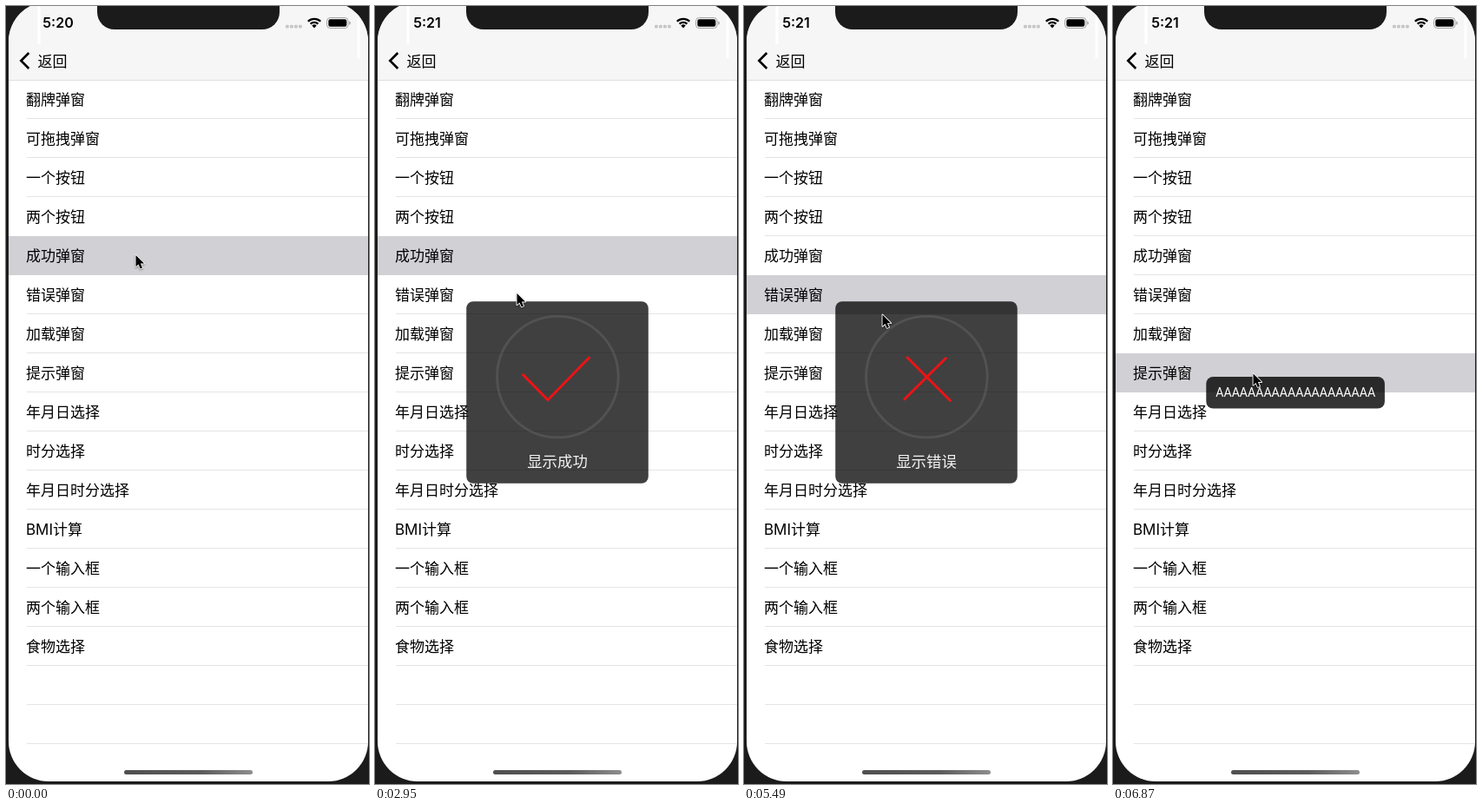
An HTML page with a canvas for the animation above (8 s loop, 418 px wide and 896 px high).

```html
<!DOCTYPE html>
<html lang="zh-CN">
<head>
<meta charset="utf-8">
<title>弹窗</title>
<style>
html, body { margin: 0; width: 100%; height: 100%; overflow: hidden; background: #1b1b1b; }
canvas { display: block; width: 418px; height: 896px; }
</style>
</head>
<body>
<canvas id="stage" width="418" height="896"></canvas>
<script>
const ctx = document.getElementById('stage').getContext('2d');
const LOOP = 8000;
const BEZEL = '#1b1b1b';
const RED = '#fb0f12';
const SANS = 'Inter, "Noto Sans CJK SC", "Noto Sans CJK", sans-serif';
const LABELS = ['翻牌弹窗', '可拖拽弹窗', '一个按钮', '两个按钮', '成功弹窗', '错误弹窗', '加载弹窗', '提示弹窗',
  '年月日选择', '时分选择', '年月日时分选择', 'BMI计算', '一个输入框', '两个输入框', '食物选择'];
const RING = { x: 210.4, y: 426.5, r: 72.2 };
const CURSOR = [[0, 149.5, 287], [2200, 149.5, 287], [2540, 163.5, 331], [5040, 163.5, 331],
  [5490, 159.5, 355.5], [5890, 155, 366], [6170, 161.5, 423.5], [LOOP, 161.5, 423.5]];

const clamp = v => Math.max(0, Math.min(1, v));
const progress = (t, from, length) => clamp((t - from) / length);
const easeInOut = p => p < 0.5 ? 2 * p * p : 1 - 2 * (1 - p) * (1 - p);

function fillRect(x, y, w, h, color) {
  ctx.fillStyle = color;
  ctx.fillRect(x, y, w, h);
}

function roundRect(x, y, w, h, r, color) {
  ctx.beginPath();
  ctx.roundRect(x, y, w, h, r);
  ctx.fillStyle = color;
  ctx.fill();
}

function polyline(points) {
  ctx.beginPath();
  points.forEach(p => ctx.lineTo(...p));
}

function stroke(color, width) {
  ctx.strokeStyle = color;
  ctx.lineWidth = width;
  ctx.stroke();
}

function text(str, x, y, font, color = '#000', align = 'left') {
  ctx.font = font;
  ctx.fillStyle = color;
  ctx.textAlign = align;
  ctx.fillText(str, x, y);
}

function drawStatusBar(clock) {
  text(clock, 60, 25.3, '600 16px ' + SANS, '#000', 'center');
  for (let i = 0; i < 4; i++) roundRect(322 + i * 5, 21.7, 3.8, 3.8, 1.2, '#c6c6c8');

  // Wi-Fi: two bands and a wedge around one centre
  const a = Math.PI * 0.25;
  for (const r of [10.2, 6.2]) {
    ctx.beginPath();
    ctx.arc(355, 25, r, -Math.PI + a, -a);
    stroke('#000', 2.3);
  }
  ctx.beginPath();
  ctx.moveTo(355, 25.6);
  ctx.arc(355, 25.2, 3.8, -Math.PI + a, -a);
  ctx.fillStyle = '#000';
  ctx.fill();

  ctx.beginPath();
  ctx.roundRect(369.5, 13.5, 24.5, 12, 3.8);
  stroke('#a3a3a5', 1);
  roundRect(371.3, 15.3, 21, 8.4, 2.2, '#000');
  roundRect(395.2, 17.5, 1.6, 4, [0, 1.6, 1.6, 0], '#a3a3a5');
}

function drawScreen(selected, clock) {
  fillRect(0, 0, 418, 896, BEZEL);
  ctx.save();
  ctx.beginPath();
  ctx.roundRect(3, -5, 414, 898, 46);
  ctx.clip();
  fillRect(0, 0, 418, 896, '#fff');
  fillRect(0, 0, 418, 85, '#f6f6f6');
  fillRect(36.5, 0, 3, 44, '#fff');
  fillRect(404.5, 0, 3, 60, '#fff');
  fillRect(0, 85, 418, 1, '#dfdfdf');

  for (let i = 0; i < 17; i++) {
    if (i !== selected && i !== selected - 1) fillRect(24, 129 + i * 45, 394, 1, '#e4e4e5');
  }
  fillRect(0, 265 + (selected - 4) * 45, 418, 45, '#d1d0d5');
  LABELS.forEach((label, i) => text(label, 23, 114 + i * 45, '17px ' + SANS));

  polyline([[26.3, 54], [17.3, 63], [26.3, 72]]);
  stroke('#000', 2.6);
  text('返回', 36.5, 69.5, '17px ' + SANS);
  drawStatusBar(clock);

  const bar = ctx.createLinearGradient(136, 0, 284, 0);
  bar.addColorStop(0, '#505050');
  bar.addColorStop(0.6, '#5c5c5c');
  bar.addColorStop(1, '#8e8e8e');
  roundRect(136, 880, 148, 5, 2.5, bar);
  ctx.restore();

  roundRect(105, -20, 210, 47, 20, BEZEL);
}

// Runs along an arc of the ring from angle 0, then along the given points;
// only the part from `rest` to the end stays visible.
function drawTrail(p, sweep, points, rest) {
  const end = sweep * Math.PI / 180;
  const corner = [RING.x + RING.r * Math.cos(end), RING.y + RING.r * Math.sin(end)];
  const arc = Math.abs(end) * RING.r;
  let total = arc, last = corner;
  for (const q of points) {
    total += Math.hypot(q[0] - last[0], q[1] - last[1]);
    last = q;
  }
  const tail = arc + Math.hypot(rest[0] - corner[0], rest[1] - corner[1]);
  const from = tail * progress(p, 0.3, 0.7);
  const to = total * p;
  if (to <= from) return;
  ctx.beginPath();
  ctx.arc(RING.x, RING.y, RING.r, 0, end, sweep < 0);
  points.forEach(q => ctx.lineTo(...q));
  ctx.setLineDash([to - from, total * 2]);
  ctx.lineDashOffset = -from;
  stroke(RED, 3);
  ctx.setLineDash([]);
}

function drawCheck(p) {
  drawTrail(p, -157, [[198.6, 454], [248.6, 402.8]], [167.6, 423.5]);
}

function drawCross(p) {
  drawTrail(p, 225, [[239.2, 455.6]], [186, 402.4]);
  drawTrail(p, -225, [[234, 403.4]], [183.8, 455.6]);
}

function drawPopup(t, { show, mark, markTime, hide, label }) {
  if (t < show || t >= hide + 290) return;
  const gone = easeInOut(progress(t, hide, 290));
  const scale = 1 - gone * 0.54;
  ctx.save();
  ctx.globalAlpha = 1 - gone;
  ctx.translate(210, 445);
  ctx.scale(scale, scale);
  ctx.translate(-210, -445);
  roundRect(101.6, 336.6, 216.8, 216.8, 8, 'rgba(0,0,0,0.8)');
  ctx.beginPath();
  ctx.arc(RING.x, RING.y, RING.r, 0, Math.PI * 2);
  stroke('rgba(255,255,255,0.1)', 3);
  text(label, 210, 533.8, '18px ' + SANS, '#fff', 'center');
  const p = progress(t, markTime, 375);
  if (p > 0) mark(p);
  ctx.restore();
}

function drawToast(t) {
  ctx.save();
  ctx.globalAlpha = easeInOut(progress(t, 6490, 370));
  roundRect(107.3, 427, 205.6, 36.6, 8, 'rgba(0,0,0,0.8)');
  text('A'.repeat(20), 210.2, 450.2, '14.1px Roboto, sans-serif', '#fff', 'center');
  ctx.restore();
}

function drawCursor(t) {
  const i = CURSOR.findIndex((k, n) => n > 0 && t < k[0]);
  const [t0, x0, y0] = CURSOR[i - 1], [t1, x1, y1] = CURSOR[i];
  const p = (t - t0) / (t1 - t0);
  ctx.save();
  ctx.translate(x0 + (x1 - x0) * p, y0 + (y1 - y0) * p);
  polyline([[0, 0], [0, 13.2], [3, 10.5], [5.2, 15.4], [7.5, 14.4], [5.4, 9.6], [9.6, 9.6]]);
  ctx.closePath();
  ctx.lineJoin = 'round';
  ctx.shadowColor = 'rgba(0,0,0,0.4)';
  ctx.shadowBlur = 2;
  ctx.shadowOffsetY = 1;
  stroke('#fff', 1.8);
  ctx.shadowColor = 'transparent';
  ctx.fillStyle = '#000';
  ctx.fill();
  ctx.restore();
}

function frame(now) {
  const t = now % LOOP;
  drawScreen(t < 3720 ? 4 : t < 6530 ? 5 : 7, t < 1200 ? '5:20' : '5:21');
  drawPopup(t, { show: 1200, mark: drawCheck, markTime: 1395, hide: 2900, label: '显示成功' });
  drawPopup(t, { show: 3720, mark: drawCross, markTime: 3930, hide: 5440, label: '显示错误' });
  if (t >= 6530) drawToast(t);
  drawCursor(t);
  requestAnimationFrame(frame);
}
requestAnimationFrame(frame);
</script>
</body>
</html>
```
